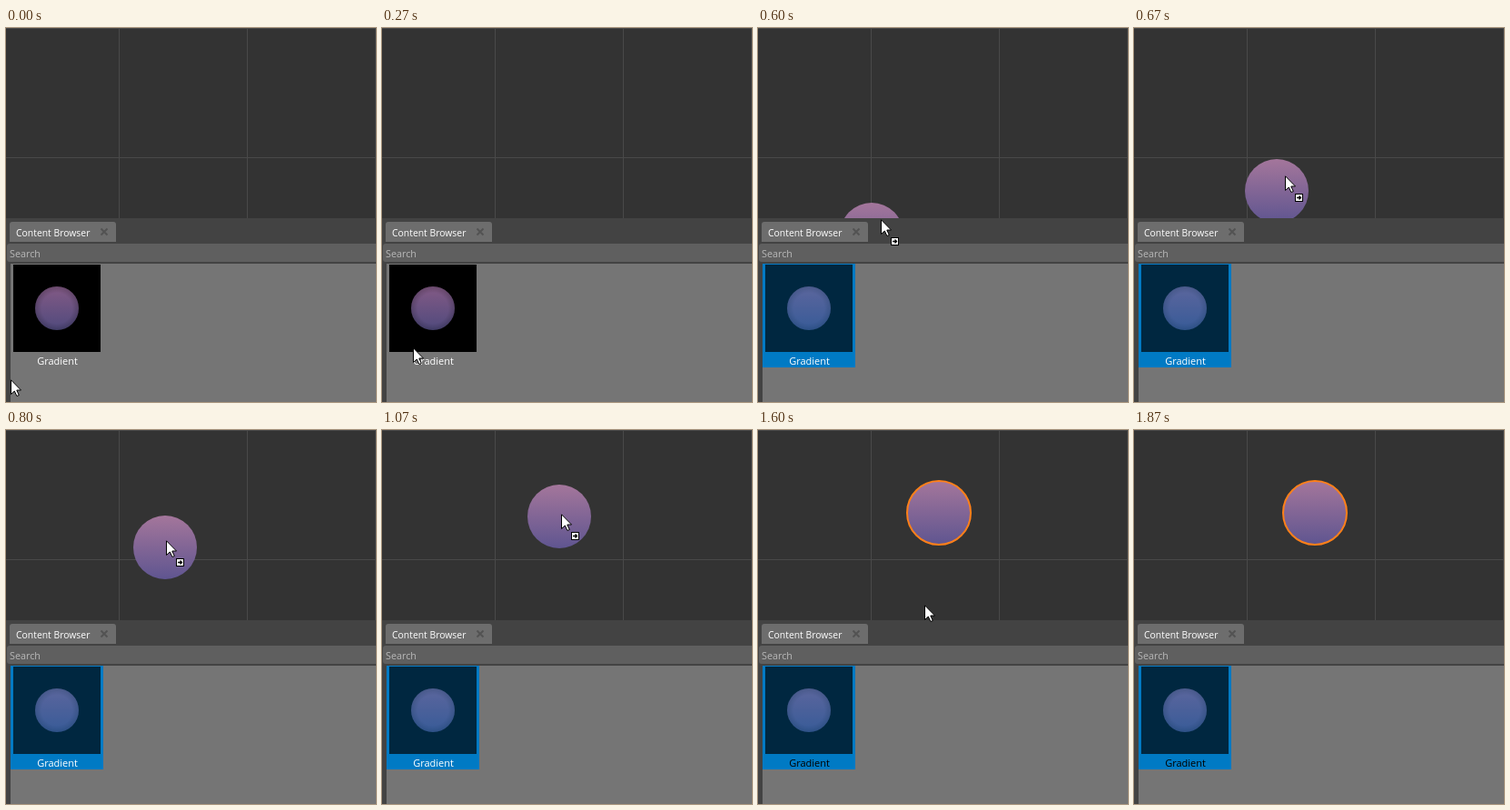
An HTML page that plays this animation: 407x411 px, repeating every 2.67 s.

```html
<!DOCTYPE html>
<html lang="en">
<head>
<meta charset="utf-8">
<title>Drag an asset into the viewport</title>
<style>
  html, body { margin: 0; width: 100%; height: 100%; overflow: hidden; background: #434343; }
  svg { display: block; width: 407px; height: 411px; }
  text { font-family: "Open Sans", "Noto Sans", sans-serif; fill: #fff; }
</style>
</head>
<body>
<svg viewBox="0 0 407 411" width="407" height="411">
  <defs>
    <linearGradient id="skin" x1="0" y1="0" x2="0" y2="1">
      <stop offset="0" stop-color="#a4769b"/>
      <stop offset="1" stop-color="#5f5590"/>
    </linearGradient>
    <linearGradient id="thumbSkin" x1="0" y1="0" x2="0" y2="1">
      <stop offset="0" stop-color="#835a85"/>
      <stop offset="1" stop-color="#504a7d"/>
    </linearGradient>
    <radialGradient id="shade">
      <stop offset=".7" stop-color="#000" stop-opacity="0"/>
      <stop offset="1" stop-color="#000" stop-opacity=".2"/>
    </radialGradient>
    <clipPath id="view"><rect width="407" height="209"/></clipPath>
  </defs>

  <!-- Viewport -->
  <rect width="407" height="209" fill="#333"/>
  <path d="M0 .5H407M0 142.5H407M124.5 0V209M265.5 0V209M406.5 0V209" stroke="#494949"/>
  <g clip-path="url(#view)">
    <circle id="ball" r="35" fill="url(#skin)" stroke-width="2"/>
  </g>

  <!-- Content panel -->
  <rect y="209" width="407" height="202" fill="#434343"/>
  <path d="M4 235V216q0-3 3-3H118q3 0 3 3V235Z" fill="#6d6d6d"/>
  <text x="11" y="229" font-size="10.4">Content Browser</text>
  <path d="M104.5 220.5l7 7m0-7l-7 7" stroke="#525252" stroke-width="1.8"/>
  <rect x="1" y="237" width="410" height="20" rx="3" fill="#5f5f5f"/>
  <text x="4" y="252" font-size="10.8" style="fill:#b8b8b8">Search</text>
  <rect x="5" y="259" width="402" height="152" fill="#757575"/>

  <!-- Asset tile -->
  <rect id="tile" x="5" y="259" width="102" height="114"/>
  <rect x="8" y="260" width="96" height="96"/>
  <circle cx="56" cy="308" r="24" fill="url(#thumbSkin)"/>
  <circle cx="56" cy="308" r="24" fill="url(#shade)"/>
  <rect id="tint" x="8" y="260" width="96" height="96" fill="#0082d4" opacity=".3"/>
  <text id="label" x="56.5" y="370" font-size="11" text-anchor="middle">Gradient</text>

  <!-- Pointers -->
  <g id="arrow">
    <path d="M-.5 -.2V15.5L3.3 12L5.9 17.5L8.3 16.5L5.8 11H10.5Z" fill="#fff" stroke="#000"/>
    <g id="badge">
      <rect x="10.5" y="19.5" width="8" height="8" fill="#fff" stroke="#000"/>
      <path d="M12 23.5H16M14.5 21.5l2 2l-2 2" fill="none" stroke="#000" stroke-width="1.3"/>
    </g>
  </g>
  <g id="forbid">
    <circle r="10"/>
    <circle r="8.2" fill="none" stroke="#fff" stroke-width="1.5"/>
    <path d="M-5.5-5.5L5.5 5.5" stroke="#fff" stroke-width="5"/>
    <path d="M-6-6L6 6" stroke="#000" stroke-width="2.4"/>
  </g>
</svg>
<script>
const LOOP = 2670, STEP = LOOP / 40;

// Moments of the drag, counted in steps
const PRESS = 5, DRAG = 7, LEAVE = 8, ENTER = 9, SETTLE = 18, DROP = 22;
const LAG = 1 / 3;  // the ball trails the pointer by this part of a step

// Turning points of the hand; power shapes the speed on the way there
const hand = [
  { at: 0, x: 6, y: 387 },
  { at: 7, x: 73, y: 306, power: 1.5 },
  { at: 10, x: 167, y: 163 },
  { at: 12, x: 177, y: 122 },
  { at: 14, x: 200, y: 85 },
  { at: 15, x: 189, y: 99 },
  { at: 16, x: 198, y: 93 },
  { at: 17, x: 199, y: 91 },
  { at: 20, x: 199, y: 91 },
  { at: 21, x: 197, y: 104 },
  { at: 28, x: 150, y: 420, power: 1.5 }
];

const el = id => document.getElementById(id);
const [ball, tile, tint, label, arrow, badge, forbid] =
  ["ball", "tile", "tint", "label", "arrow", "badge", "forbid"].map(el);

const show = (node, on) => node.setAttribute("display", on ? "inline" : "none");

function place(node, step) {
  const end = Math.max(1, hand.findIndex(key => key.at >= step));
  const past = step >= hand.at(-1).at;
  const from = hand[past ? hand.length - 2 : end - 1];
  const to = past ? hand.at(-1) : hand[end];
  const u = Math.min(1, (step - from.at) / (to.at - from.at)) ** (to.power || 1);
  const mix = (a, b) => Math.round(a + (b - a) * u);
  node.setAttribute("transform", `translate(${mix(from.x, to.x)} ${mix(from.y, to.y)})`);
}

function render(time) {
  const step = Math.floor((time + 6) / STEP) % 40;
  const selected = step >= PRESS;
  const dropped = step >= DROP;
  const inView = step >= ENTER;
  const blocked = step >= DRAG && !inView;

  show(tile, selected);
  show(tint, selected);
  tile.setAttribute("fill", step < LEAVE ? "#0099e6" : "#007ac4");
  label.style.fill = dropped ? "#000" : "#fff";

  show(ball, inView);
  place(ball, Math.max(0, Math.min(step, SETTLE) - LAG));
  ball.setAttribute("stroke", dropped ? "#ff8019" : "none");

  show(forbid, blocked);
  show(arrow, !blocked);
  show(badge, inView && !dropped);
  place(forbid, step);
  place(arrow, step);
}

const start = performance.now();
function tick() {
  render((performance.now() - start) % LOOP);
  requestAnimationFrame(tick);
}
tick();
</script>
</body>
</html>
```
